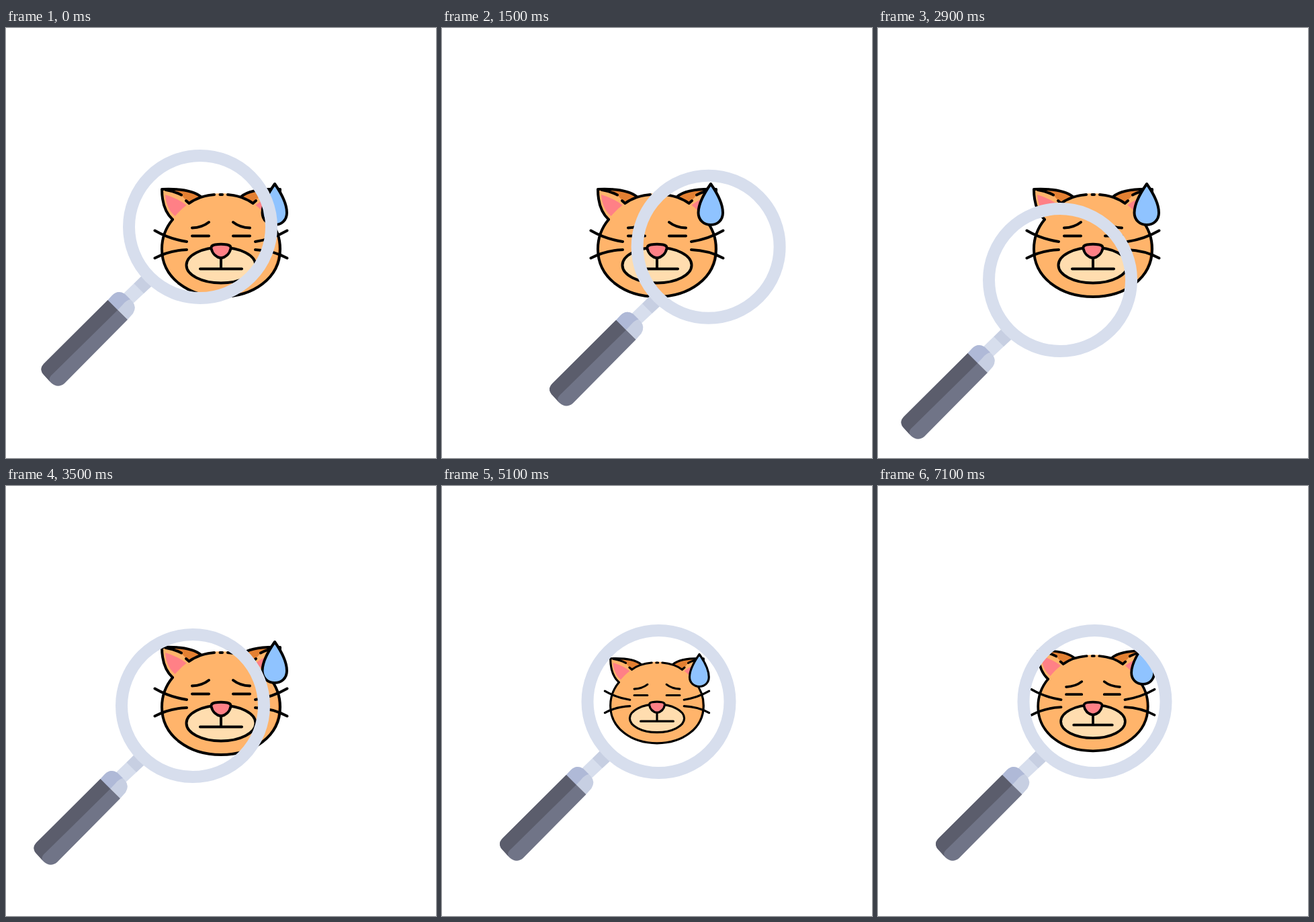
Write an HTML page that moves like this. It is 640 px wide and 640 px high and loops after 7200 ms.

```html
<!DOCTYPE html>
<html lang="en">
<head>
<meta charset="utf-8">
<title>Cat under a magnifying glass</title>
<style>
  html, body { margin: 0; width: 100%; height: 100%; overflow: hidden; background: #fff; }
  svg { display: block; width: 100vw; height: 100vh; }
  .ink { fill: none; stroke: #000; stroke-width: 4; stroke-linecap: round; stroke-linejoin: round; }
  .fur { fill: #ffb46b; }
  .shade { fill: #e48032; }
  .pink { fill: #ff8086; }
  .cream { fill: #ffddaf; }
  .water { fill: #8fc3ff; }
</style>
</head>
<body>
<svg viewBox="0 0 640 640">
  <defs>
    <!-- left half of the features that mirror -->
    <g id="ear">
      <path class="shade" d="M232 240C256 239 278 241 290 251L272 262Z"/>
      <path class="fur" d="M232 240Q255 243 263 251L275 264 248 285C236 274 232 258 232 240Z"/>
      <path class="pink" d="M237 248Q257 254 269 264L253 281C243 274 238 262 237 248Z"/>
    </g>
    <g id="lines" class="ink">
      <path d="M248 285C236 274 232 258 232 240C256 239 278 241 290 251"/>
      <path d="M238 241Q251 243 261 248.500M268 257L272.500 261Q287 250 310 248"/>
      <path d="M277 309.500H302M277 297.500Q292 297 302 289"/>
      <path d="M221.500 301.500Q243 314 269 318M221.500 342.500Q243 331 269 330"/>
    </g>
  </defs>
  <g id="cat">
    <use href="#ear"/>
    <use href="#ear" transform="matrix(-1 0 0 1 640 0)"/>
    <path class="fur" d="M248 285Q257 272 272 261C283 250 304 246 320 246S357 250 368 261Q383 272 392 285C402 297 408 312 408 329C408 372 368 400 320 400S232 372 232 329C232 312 238 297 248 285Z"/>
    <path class="shade" d="M402 299Q408 313 408 329C408 352 397 370 379 383C398 366 405 348 405 329Q405 313 402 299Z"/>
    <path class="ink" d="M248 285C238 297 232 312 232 329C232 372 272 400 320 400S408 372 408 329C408 312 402 297 392 285M318.500 248H322"/>
    <ellipse class="ink cream" cx="320" cy="353" rx="51.500" ry="26.500"/>
    <path class="ink pink" d="M311 322.500Q320 321 329 322.500Q335 323.500 334.500 328C333 336 327 341 320 342.500C313 341 307 336 305.500 328Q305 323.500 311 322.500Z"/>
    <path class="ink" d="M320 342V358.500M289 358.500H351"/>
    <use href="#lines"/>
    <use href="#lines" transform="matrix(-1 0 0 1 640 0)"/>
    <path class="ink water" d="M400 232C407 242 418 260 418 275C418 286 410 293 400 293S381.500 286 381.500 275C381.500 260 393 242 400 232Z"/>
  </g>
  <g id="glass">
    <path fill="#d7deed" d="M202 369L172 398 187 412 217 384Z"/>
    <path fill="#c7cfe2" d="M204 367L190.500 380.500 205 395 219 382Z"/>
    <path fill="#c7cfe2" d="M151.500 405L158 398Q167 389 177 396L188 407Q195 415 189 425L181 434Z"/>
    <path fill="#afb9d7" d="M151.500 405L158 398Q167 389 177 396L185 404Q179 405 174 411.500L166 420Z"/>
    <path fill="#707487" d="M151.500 405L57 499Q48 508 57 517L67 528Q77 537 87 529L181 434Z"/>
    <path fill="#5b5d6c" d="M151.500 405L57 499Q48 508 57 517L67 528Q61 522 70 514.500L166 420Z"/>
    <circle cx="289" cy="296" r="106" fill="none" stroke="#d7deed" stroke-width="18"/>
  </g>
</svg>
<script>
const LOOP = 7200, STEP = 100;
const cat = document.getElementById('cat');
const glass = document.getElementById('glass');

// Lens centres, evenly spaced in time
const route = [
  [289, 296], [331, 290.5], [371.5, 289.3], [391.5, 312.5], [398.5, 345.5], [380, 373],
  [322, 379], [265, 372], [271, 336], [300, 312], [322.5, 321]
];

const progress = (t, from, to) => Math.min(1, Math.max(0, (t - from) / (to - from)));

function ease(t, from, to) {
  const s = progress(t, from, to);
  return s * s * (3 - 2 * s);
}

// Catmull-Rom curve through the points, u from 0 to 1
function along(points, u) {
  const n = points.length - 1;
  const i = Math.min(n - 1, Math.floor(u * n)), s = u * n - i;
  const at = k => points[Math.min(n, Math.max(0, k))];
  const [a, b, c, d] = [at(i - 1), at(i), at(i + 1), at(i + 2)];
  return [0, 1].map(j => b[j] + s / 2 * (c[j] - a[j] +
    s * (2 * a[j] - 5 * b[j] + 4 * c[j] - d[j] +
    s * (3 * (b[j] - c[j]) + d[j] - a[j]))));
}

function draw(ms) {
  const t = Math.floor((ms % LOOP) / STEP) * STEP;
  const [x, y] = along(route, progress(t, 100, 4200));
  const size = 1 - 0.327 * (ease(t, 4500, 5500) - ease(t, 5700, 7700));
  glass.setAttribute('transform', `translate(${x - 289} ${y - 296})`);
  cat.setAttribute('transform', `translate(320 319) scale(${size}) translate(-320 -319)`);
}

const start = performance.now();
function tick() {
  draw(performance.now() - start);
  requestAnimationFrame(tick);
}
draw(0);
requestAnimationFrame(tick);
</script>
</body>
</html>
```
